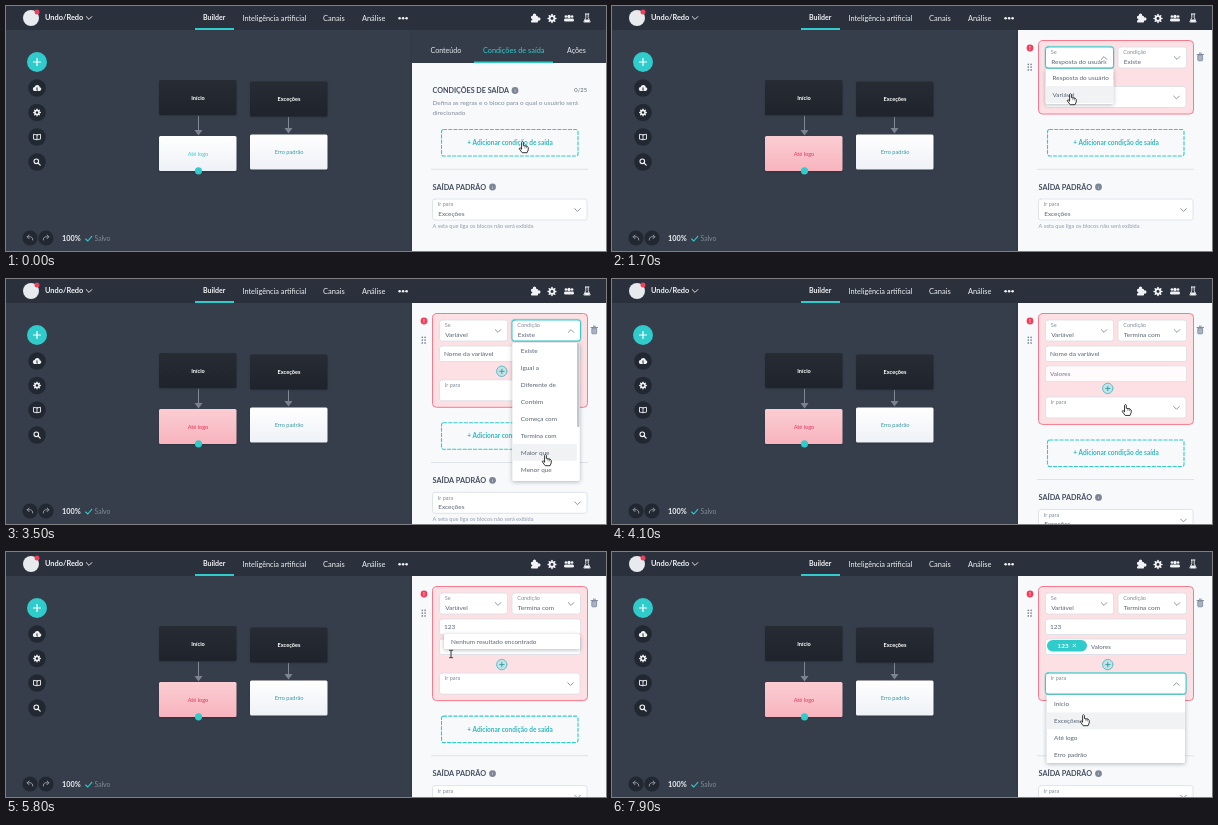
An HTML page with a canvas that plays this animation: 600 by 245 pixels, repeating every 8000 ms.

```html
<!DOCTYPE html>
<html lang="pt">
<head>
<meta charset="utf-8">
<title>Builder</title>
<style>
html, body { margin: 0; width: 100%; height: 100%; overflow: hidden; background: #363e4b; }
canvas { display: block; width: 600px; height: 245px; }
</style>
</head>
<body>
<canvas id="stage"></canvas>
<script>
const LOOP = 8000, STEP = 100;
const TEAL = '#30cbcb', INK = '#596475', HEAD = '#444e5e', SOFT = '#818c9b', RED = '#ee3f5c', LINE = '#d9dee6';
const cv = document.getElementById('stage');
const c = cv.getContext('2d');
const dpr = window.devicePixelRatio || 1;
cv.width = 600 * dpr;
cv.height = 245 * dpr;

const ramp = (t, a, b) => {
  const p = Math.min(1, Math.max(0, (t - a) / (b - a)));
  return p * p * (3 - 2 * p);
};
const within = (t, a, b) => t >= a && t < b;

function text(s, x, y, size, color, weight = 400, align = 'left') {
  c.font = `${weight} ${size}px Lato, "Open Sans", sans-serif`;
  c.textAlign = align;
  c.fillStyle = color;
  c.fillText(s, x, y + size * 0.35);
}
function box(x, y, w, h, r, fill, stroke, lw = 0.8) {
  c.beginPath();
  c.roundRect(x, y, w, h, r);
  if (fill) { c.fillStyle = fill; c.fill(); }
  if (stroke) { c.strokeStyle = stroke; c.lineWidth = lw; c.stroke(); }
}
function disc(x, y, r, fill, stroke, lw = 0.8) {
  c.beginPath();
  c.arc(x, y, r, 0, 7);
  if (fill) { c.fillStyle = fill; c.fill(); }
  if (stroke) { c.strokeStyle = stroke; c.lineWidth = lw; c.stroke(); }
}
function line(points, color, lw = 1) {
  c.beginPath();
  points.forEach(([x, y]) => c.lineTo(x, y));
  c.strokeStyle = color;
  c.lineWidth = lw;
  c.stroke();
}
function shadowed(blur, draw) {
  c.save();
  c.shadowColor = 'rgba(20,28,40,.3)';
  c.shadowBlur = blur * dpr;
  c.shadowOffsetY = dpr;
  draw();
  c.restore();
}
function chevron(x, y, up, color = SOFT, s = 2.8) {
  const d = up ? -1.4 : 1.4;
  line([[x - s, y - d], [x, y + d], [x + s, y - d]], color, 0.9);
}
function plus(x, y, s, color, lw) {
  line([[x - s, y], [x + s, y]], color, lw);
  line([[x, y - s], [x, y + s]], color, lw);
}
function info(x, y) {
  disc(x, y, 3.4, '#7c8695');
  text('i', x, y, 4.6, '#fff', 400, 'center');
}
function gear(x, y, r, hole) {
  for (let i = 0; i < 4; i++) {
    const a = i * Math.PI / 4, dx = Math.cos(a) * r, dy = Math.sin(a) * r;
    line([[x - dx, y - dy], [x + dx, y + dy]], '#f0f2f4', r * 0.4);
  }
  disc(x, y, r * 0.82, '#f0f2f4');
  disc(x, y, r * 0.36, hole);
}

function topBar() {
  const bar = '#2a313d', white = '#f0f2f4';
  c.fillStyle = bar;
  c.fillRect(0, 0, 600, 24);
  disc(25, 12, 8, '#e8ebed');
  disc(31, 6, 2.5, RED);
  text('Undo/Redo', 39, 11.5, 7.4, white, 700);
  chevron(83, 12, false, white);
  text('Builder', 197, 12, 7, white, 700);
  c.fillStyle = TEAL;
  c.fillRect(189, 22, 39, 2);
  text('Inteligência artificial', 236.5, 12, 7.3, white);
  text('Canais', 317, 12, 7.5, white);
  text('Análise', 356, 12, 7.4, white);
  for (let i = 0; i < 3; i++) disc(393.6 + i * 3.5, 12.3, 1.3, white);

  box(525, 10, 7, 6.5, 0.8, white);
  disc(528.5, 9.3, 1.7, white);
  disc(532.8, 13, 1.7, white);
  disc(525.2, 13.5, 1.1, bar);
  gear(546, 12.5, 3.9, bar);
  for (const [x, r] of [[559.9, 1.3], [566.1, 1.3], [563, 1.7]]) {
    disc(x, 10.5, r, white);
    box(x - r * 1.4, 12.6, r * 2.8, 3, 1.4, white);
  }
  line([[579.8, 8], [579.8, 11.5], [577.8, 16], [584.2, 16], [582.2, 11.5], [582.2, 8]], white, 0.9);
  line([[579, 8], [583, 8]], white, 0.9);
  box(578.8, 13.4, 4.4, 2.5, 0.4, white);
}

function sideTools() {
  const dark = '#222832', white = '#f0f2f4';
  disc(31, 56, 10, TEAL);
  plus(31, 56, 3.5, '#fff', 1.2);
  for (const y of [82, 106.5, 131, 156]) disc(31, y, 8.8, dark);
  disc(28.7, 83, 1.9, white);
  disc(31.2, 81.4, 2.5, white);
  disc(33.5, 83.1, 1.8, white);
  box(28, 82.5, 6, 2.4, 1, white);
  line([[31, 84.4], [31, 81.8]], dark, 1);
  gear(31, 106.5, 3.3, dark);
  line([[31, 128.9], [27.5, 128.3], [27.5, 133.1], [31, 133.7], [31, 128.9]], white, 0.9);
  line([[31, 128.9], [34.5, 128.3], [34.5, 133.1], [31, 133.7]], white, 0.9);
  disc(30.3, 155.3, 2.3, null, white, 1.1);
  line([[32, 157], [34.2, 159.2]], white, 1.2);

  for (const [x, d] of [[24, -1], [40, 1]]) {
    disc(x, 232, 7.6, dark);
    const p = q => x + q * d;
    line([[p(-2.7), 234.2], [p(-2.4), 232], [p(-0.8), 230.8], [p(2.8), 230.8]], '#a4abb5', 0.8);
    line([[p(1), 228.9], [p(2.8), 230.8], [p(1), 232.7]], '#a4abb5', 0.8);
  }
  text('100%', 56, 232.7, 7.3, white, 700);
  line([[79.7, 233], [81.8, 235], [85.8, 230.3]], TEAL, 1.1);
  text('Salvo', 88.5, 232.7, 6.8, '#7f8b98');
}

function block(x, y, label, top, bottom, ink) {
  const g = c.createLinearGradient(0, y, 0, y + 35);
  g.addColorStop(0, top);
  g.addColorStop(1, bottom);
  shadowed(2, () => box(x, y, 77.5, 35, 1.5, g));
  text(label, x + 39, y + 18, 5.6, ink, ink === '#fff' ? 700 : 400, 'center');
}
function arrow(x, y1, y2) {
  line([[x, y1], [x, y2 - 4]], '#8a919b', 0.9);
  c.beginPath();
  c.moveTo(x - 4, y2 - 6);
  c.lineTo(x + 4, y2 - 6);
  c.lineTo(x, y2 - 0.5);
  c.fillStyle = '#7c838e';
  c.fill();
}
function flow(bad) {
  arrow(192.5, 110, 130);
  arrow(282.5, 111, 128);
  block(153, 74, 'Início', '#262b34', '#1f242c', '#fff');
  block(244, 75.5, 'Exceções', '#262b34', '#1f242c', '#fff');
  if (bad) block(153, 130, 'Até logo', '#fbcdd3', '#f8b4be', '#e3355a');
  else block(153, 130, 'Até logo', '#ffffff', '#eef1f6', TEAL);
  block(244, 128.5, 'Erro padrão', '#ffffff', '#eef1f6', '#3c9aa6');
  disc(192.5, 164.8, 3.6, TEAL);
}

function select(x, y, w, label, value, focus, open) {
  if (open) box(x, y, w, 21, 2.5, null, 'rgba(48,203,203,.35)', 2.4);
  box(x, y, w, 21, 2.5, '#fff', focus ? TEAL : LINE, open ? 1 : 0.8);
  text(label, x + 5.3, y + 5.3, 5.5, SOFT);
  c.save();
  c.beginPath();
  c.rect(x, y, w - 7, 21);
  c.clip();
  text(value, x + 5.7, y + 14.6, 6.5, INK);
  c.restore();
  chevron(x + w - 9.5, y + 11, open, SOFT);
}

function intro(t, dy) {
  c.save();
  c.translate(0, dy);
  c.fillStyle = '#343c49';
  c.fillRect(406, 24, 194, 33);
  text('Conteúdo', 424.5, 44.5, 7.1, '#e8ebef');
  text('Condições de saída', 477, 44.5, 7.3, TEAL);
  text('Ações', 561, 44.5, 7.1, '#e8ebef');
  c.fillStyle = TEAL;
  c.fillRect(468, 55.5, 79, 1.5);
  text('CONDIÇÕES DE SAÍDA', 426.5, 84.5, 7.2, HEAD, 700);
  info(509, 84.5);
  text((t < 300 ? '0' : '1') + '/25', 581, 84, 5.8, INK, 400, 'right');
  text('Defina as regras e o bloco para o qual o usuário será', 426.5, 97, 6.4, SOFT);
  text('direcionado', 426.5, 106.5, 6.4, SOFT);
  c.restore();
}

function footer(dy) {
  c.save();
  c.translate(0, dy);
  c.setLineDash([3.2, 2]);
  box(435.5, 123.5, 136.5, 26.5, 2, null, TEAL, 1.1);
  c.setLineDash([]);
  text('+ Adicionar condição de saída', 504, 136.7, 6.5, '#31b9bf', 700, 'center');
  c.fillStyle = '#d9dde3';
  c.fillRect(425, 162.8, 157, 0.8);
  text('SAÍDA PADRÃO', 426.5, 181, 7.3, HEAD, 700);
  info(486.5, 181);
  select(426.5, 193, 154.5, 'Ir para', 'Exceções');
  text('A seta que liga os blocos não será exibida', 426.5, 220, 5.6, '#929cab');
  c.restore();
}

function typed(t, start, gap) {
  return '123'.slice(0, Math.max(0, Math.floor((t - start) / gap) + 1));
}
function card(t, y, r1, r2) {
  const rows = r1 + r2;
  c.save();
  c.translate(0, y);
  c.globalAlpha = ramp(t, 200, 500);
  box(426.5, 0.5, 155, 73.5 + rows, 4, '#fde0e4', '#f57a8d', 1);
  disc(418, 8, 3.4, RED);
  text('!', 418, 8, 5, '#fff', 700, 'center');
  for (let i = 0; i < 6; i++) disc(416.3 + i % 2 * 2.8, 24.3 + (i >> 1) * 2.8, 0.85, '#7d8797');
  box(585.8, 15, 4.8, 5.8, 0.8, '#a9b2bf', '#79869a', 0.8);
  line([[584.8, 14.5], [591.6, 14.5]], '#79869a', 0.9);
  line([[587, 13.2], [589.4, 13.2]], '#79869a', 0.9);

  const openSe = within(t, 1100, 1800), openIf = within(t, 2200, 3800), openTo = t >= 7300;
  select(433.5, 7, 68, 'Se', t < 1800 ? 'Resposta do usuário' : 'Variável', within(t, 900, 1900), openSe);
  select(506, 7, 68.5, 'Condição', t < 3800 ? 'Existe' : 'Termina com', within(t, 2200, 3900), openIf);

  if (r1 > 0) {
    c.globalAlpha = r1 / 20.3;
    box(433.5, 33, 141, 15.5, 2, '#fff', LINE);
    const name = typed(t, 5100, 200);
    text(name || 'Nome da variável', 438, 41, 6.5, INK);
    if (within(t, 4500, 5100) && t % 1000 >= 500) line([[437.7, 37.5], [437.7, 44.5]], '#222', 0.8);
  }
  if (r2 > 0) {
    c.globalAlpha = r2 / 20.3;
    box(433.5, 53, 141, 15.5, 2, '#fff', LINE);
    if (t >= 6600) {
      box(435, 54, 40, 11.5, 5.7, TEAL);
      text('123', 445.5, 59.5, 6.4, '#fff', 700);
      line([[461, 58.2], [463.6, 60.8]], '#fff', 0.9);
      line([[463.6, 58.2], [461, 60.8]], '#fff', 0.9);
      text('Valores', 479, 61, 6.2, INK);
    } else {
      const value = typed(t, 6100, 100);
      text(value || 'Valores', 438, 60.5, 6.4, INK);
    }
  }
  c.globalAlpha = ramp(t, 200, 500);
  disc(495.8, 38 + rows, 5.2, '#c6e2e5', '#46bdc3', 0.9);
  plus(495.8, 38 + rows, 2.2, '#2a9aa5', 0.9);
  select(433.5, 46.5 + rows, 140.5, 'Ir para', '', openTo, openTo);
  c.restore();
}

// Option list; the row under the pointer is tinted.
function menu(o, alpha, cur) {
  if (alpha <= 0) return;
  c.save();
  c.globalAlpha = alpha;
  // A shadow would show through a translucent sheet.
  shadowed(alpha < 1 ? 0 : 4, () => {
    if (alpha < 1) c.shadowColor = 'transparent';
    box(o.x, o.y, o.w, o.h, 1.5, '#fff');
  });
  o.items.forEach((s, i) => {
    const y = o.first + i * o.gap;
    if (o.tint !== false && Math.abs(cur.y - 5 - y) < o.gap / 2) {
      c.fillStyle = '#f0f2f4';
      c.fillRect(o.x, y - o.gap / 2, o.w - (o.bar || 0), o.gap);
    }
    text(s, o.x + o.pad, y, 6.4, o.ink || INK);
  });
  c.restore();
}
function menus(t, cur) {
  menu({ x: 433.5, y: 63, w: 68, h: 35, first: 71.5, gap: 17, pad: 7,
    items: ['Resposta do usuário', 'Variável'] }, ramp(t, 1000, 1300) * (1 - ramp(t, 1700, 1900)), cur);

  const a = ramp(t, 2150, 2550) * (1 - ramp(t, 3700, 3900));
  menu({ x: 506.3, y: 63.5, w: 67.5, h: 138.5, first: 72, gap: 16.9, pad: 8.5, bar: 3,
    items: ['Existe', 'Igual a', 'Diferente de', 'Contém', 'Começa com', 'Termina com', 'Maior que', 'Menor que'] }, a, cur);
  if (a > 0) {
    c.globalAlpha = a;
    box(571, 64, 2.5, 84, 1, '#c3c7cd');
    c.globalAlpha = 1;
  }

  if (within(t, 4500, 5100)) {
    menu({ x: 438, y: 82, w: 136, h: 89, first: 90, gap: 17.2, pad: 7, bar: 7, ink: '#476f8b',
      items: ['bucket.?', 'resource.?', 'application.identifier', 'application.domain', 'application.instance'] },
      ramp(t, 4400, 4700), { y: cur.y + 12 });
    c.fillStyle = '#f1f1f1';
    c.fillRect(567, 82, 7, 89);
    c.fillStyle = '#c1c3c6';
    c.fillRect(567.6, 89, 5.8, 8);
    for (const [y, d] of [[86, -1.6], [166.5, 1.6]]) {
      c.beginPath();
      c.moveTo(568.7, y - d / 2);
      c.lineTo(572.3, y - d / 2);
      c.lineTo(570.5, y + d / 2);
      c.fillStyle = '#555';
      c.fill();
    }
  }
  if (within(t, 5100, 6000)) {
    menu({ x: 438, y: 82, w: 136, h: 15, first: 89.7, gap: 15, pad: 7, tint: false,
      items: ['Nenhum resultado encontrado'] }, 1, cur);
  }
  menu({ x: 434.5, y: 143, w: 138.5, h: 68, first: 152, gap: 16.8, pad: 7.5,
    items: ['Início', 'Exceções', 'Até logo', 'Erro padrão'] }, ramp(t, 7200, 7500), { y: cur.y + 5 });
}

const path = [
  [0, 518, 141], [200, 518, 141], [900, 490, 55], [1300, 490, 55], [1700, 460, 93], [1900, 460, 93],
  [2200, 556, 61], [2500, 556, 61], [3000, 540, 125], [3500, 541, 181], [3700, 535, 161], [3900, 535, 161],
  [4400, 478, 75], [4800, 478, 83], [5400, 478, 83], [5800, 445, 102], [6000, 447, 96], [6700, 447, 96],
  [7200, 520, 133], [7500, 520, 133], [7900, 473, 168]
];
function pointer(t) {
  const i = Math.max(1, path.findIndex(k => k[0] >= t));
  const [t0, x0, y0] = path[i - 1], [t1, x1, y1] = path[i];
  const p = ramp(t, t0, t1);
  return { x: x0 + (x1 - x0) * p, y: y0 + (y1 - y0) * p };
}
function drawPointer(t, { x, y }) {
  c.save();
  c.translate(x, y);
  if (within(t, 4300, 7000)) {
    line([[0, -3.5], [0, 3.5]], '#222', 0.9);
    for (const s of [-3.7, 3.7]) line([[-1.7, s], [1.7, s]], '#222', 0.8);
  } else {
    c.beginPath();
    c.moveTo(-2.4, 1.8);
    c.lineTo(-2.4, -4.5);
    c.quadraticCurveTo(-1.5, -6.3, -0.6, -4.5);
    c.lineTo(-0.6, -1.4);
    c.quadraticCurveTo(3.9, -1.3, 4.3, 0.4);
    c.lineTo(4.2, 3);
    c.lineTo(3.1, 5.7);
    c.lineTo(-1.8, 5.7);
    c.lineTo(-4.7, 1.8);
    c.quadraticCurveTo(-4.5, -0.1, -2.4, 1.8);
    c.closePath();
    c.fillStyle = '#fff';
    c.fill();
    c.strokeStyle = '#222';
    c.lineWidth = 0.9;
    c.stroke();
    for (const q of [0.9, 2.5]) line([[q, -1.1], [q, 1]], '#444', 0.5);
  }
  c.restore();
}

function draw(t) {
  c.setTransform(dpr, 0, 0, dpr, 0, 0);
  c.lineCap = c.lineJoin = 'round';
  c.fillStyle = '#363e4b';
  c.fillRect(0, 0, 600, 245);
  flow(t >= 400);
  sideTools();

  const grow = 85 * ramp(t, 200, 500), scroll = 85 * ramp(t, 300, 800);
  const r1 = 20.3 * ramp(t, 2400, 2800), r2 = 20.3 * ramp(t, 3800, 4200);
  shadowed(3, () => {
    c.fillStyle = '#f7f9fb';
    c.fillRect(406, 24, 194, 221);
  });
  c.save();
  c.beginPath();
  c.rect(406, 24, 194, 221);
  c.clip();
  intro(t, -scroll);
  footer(grow - scroll + r1 + r2);
  if (t > 200) card(t, 119 - scroll, r1, r2);
  c.restore();

  topBar();
  const cur = pointer(t);
  menus(t, cur);
  drawPointer(t, cur);
}

let start = null;
function tick(now) {
  if (start === null) start = now;
  const t = (now - start) % LOOP;
  draw(Math.floor(t / STEP) * STEP);
  requestAnimationFrame(tick);
}
draw(0);
requestAnimationFrame(tick);
</script>
</body>
</html>
```
